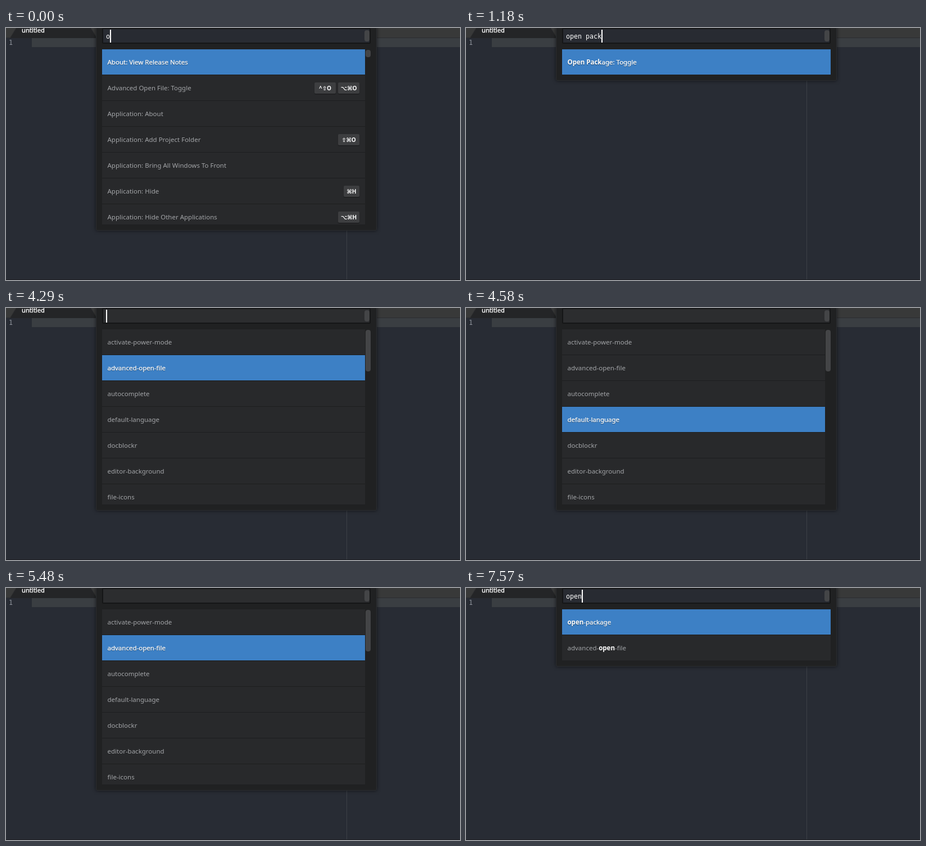
An HTML page that plays this animation: 808 px wide and 449 px high, repeating every 8000 ms.

```html
<!DOCTYPE html>
<html lang="en">
<head>
<meta charset="utf-8">
<title>Open package</title>
<style>
  html, body { margin: 0; width: 100%; height: 100%; overflow: hidden; background: #282c34; }
  #stage { position: relative; width: 808px; height: 449px; overflow: hidden; background: #282c34;
    font: 11.5px "Noto Sans", "Open Sans", sans-serif; }
  #stage div, #stage svg { position: absolute; box-sizing: border-box; }
  #line { left: 46px; top: 18px; width: 762px; height: 16px; background: #3a3e42; }
  #guide { left: 606px; top: 18px; width: 1px; height: 431px; background: #3c4047; }
  #foot { left: 0; top: 448px; width: 808px; height: 1px; background: #1c1e22; }
  #name { left: 28px; top: -4px; line-height: 16px; font-size: 11.2px; color: #fff; -webkit-text-stroke: .35px #fff; }
  #num { left: 5px; top: 18px; line-height: 16px; color: #8f949c; font: 11.65px/16px "DejaVu Sans Mono", monospace; }
  #panel { left: 160px; top: -10px; width: 500px; background: #202122; border: 1px solid #2b2d30;
    border-radius: 3px; box-shadow: 0 0 6px rgba(0, 0, 0, .6); }
  #field { left: 171px; top: 0; width: 478px; height: 28px; border: 2px solid #151617; border-radius: 2px; }
  #typed { left: 178px; top: 3px; white-space: pre; color: #fff; font: 11.65px/24px "DejaVu Sans Mono", monospace; }
  #caret { top: 3px; width: 2px; height: 23px; background: #fff; }
  .bar { width: 9px; border-radius: 4px; background: #444547; }
  #list { left: 171px; top: 38px; overflow: hidden; background: #1d1e1f; }
  #list .row { left: 0; width: 100%; height: 45px; padding-left: 9.5px; line-height: 45px;
    white-space: pre; color: #a3a5a8; background: #28292b; }
  #list .row.on { color: #fff; background: #3d80c5; text-shadow: 0 1px 1px rgba(0, 0, 0, .5); -webkit-text-stroke: .25px #fff; }
  #list b { color: #fff; -webkit-text-stroke: 0; }
  #list .key { top: 13px; height: 20px; border-radius: 2px; background: #3d3e40; color: #fff;
    font: bold 10px/20px "Noto Sans", "DejaVu Sans", sans-serif; text-align: center; box-shadow: 0 1px 1px #18191a; }
</style>
</head>
<body>
<div id="stage">
  <svg width="808" height="18" style="left:0;top:0">
    <rect width="808" height="18" fill="#383939"/>
    <path d="M0 17.5H808" stroke="#2b2d30"/>
    <path d="M7 18L18 0H151L162 18Z" fill="#242527"/>
    <path d="M7 18L18 0M151 0L162 18" stroke="#2f3032" fill="none"/>
  </svg>
  <div id="name">untitled</div>
  <div id="line"></div>
  <div id="num">1</div>
  <div id="guide"></div>
  <div id="foot"></div>
  <div id="panel"></div>
  <div id="field"></div>
  <div class="bar" style="left:638px;top:4px;height:20px"></div>
  <div id="typed"></div>
  <div id="caret"></div>
  <div id="list"></div>
  <div class="bar" id="thumb" style="left:640px;top:39px"></div>
</div>
<script>
const LOOP = 8000, CHAR = 7.0, LIST_MAX = 312;
const $ = id => document.getElementById(id);

// Each entry is a label, with its shortcuts after "|".
const list = (thumb, ...items) => ({ thumb, items });
const toggle = "Open Package: Toggle";
const openFile = "Advanced Open File: Toggle|^⇧O|⌥⌘O";
const all = list(13, "About: View Release Notes", openFile, "Application: About",
  "Application: Add Project Folder|⇧⌘O", "Application: Bring All Windows To Front",
  "Application: Hide|⌘H", "Application: Hide Other Applications|⌥⌘H");
const opens = list(90, toggle, openFile, "Application: Open|⌘O", "Application: Open Folder",
  "Application: Open License", "Application: Open Your Config", "Application: Open Your Keymap");
const openP = list(0, toggle, "Application: Open Your Snippets");
const one = list(0, toggle);

const packages = list(74, "activate-power-mode", "advanced-open-file", "autocomplete",
  "default-language", "docblockr", "editor-background", "file-icons");
const withO = list(150, "open-package", "advanced-open-file", "docblockr", "autocomplete",
  "editor-background", "activate-power-mode", "file-icons");
const withOp = list(0, "open-package", "advanced-open-file", "autocomplete");
const withOpen = list(0, "open-package", "advanced-open-file");

// Time, then what changes from then on.
const steps = [
  [0, { text: "o", query: "", list: all, sel: 0, caret: 1 }],
  [150, { text: "op", list: opens }],
  [300, { text: "ope" }],
  [450, { text: "open" }],
  [590, { text: "open " }],
  [740, { text: "open p", list: openP }],
  [890, { text: "open pa", list: one }],
  [1030, { text: "open pac" }],
  [1180, { text: "open pack" }],
  [1330, { text: "open packa" }],
  [1480, { text: "open packag" }],
  [1620, { text: "open package" }],
  [2070, { caret: 0 }],
  [2360, { caret: 1 }],
  [2810, { caret: 0 }],
  [3250, { text: "", list: packages, caret: 1 }],
  [3550, { caret: 0 }],
  [3990, { caret: 1 }],
  [4290, { sel: 1 }],
  [4430, { sel: 2, caret: 0 }],
  [4580, { sel: 3 }],
  [4730, { sel: 4, caret: 1 }],
  [5180, { sel: 3, caret: 0 }],
  [5330, { sel: 2 }],
  [5480, { sel: 1 }],
  [5620, { caret: 1 }],
  [5770, { sel: 0 }],
  [5920, { caret: 0 }],
  [6370, { caret: 1 }],
  [6820, { caret: 0 }],
  [6970, { text: "o", list: withO, caret: 1 }],
  [7270, { text: "op", list: withOp }],
  [7420, { text: "ope" }],
  [7570, { text: "open", list: withOpen }]
];

let last = {};
const states = steps.map(([at, change]) => {
  last = { ...last, query: change.text ?? last.query, ...change, at };
  return last;
});

// Bold the whole match if there is one, otherwise its letters in order.
function mark(label, query) {
  if (!query) return label;
  const low = label.toLowerCase(), i = low.indexOf(query);
  if (i >= 0) {
    const end = i + query.length;
    return label.slice(0, i) + "<b>" + label.slice(i, end) + "</b>" + label.slice(end);
  }
  const letters = query.replace(/ /g, "");
  let n = 0;
  return [...label].map(c => c.toLowerCase() === letters[n] ? (n++, `<b>${c}</b>`) : c).join("");
}

function row(item, i, s) {
  const [label, ...keys] = item.split("|");
  let right = 10;
  const badges = keys.reverse().map(k => {
    const w = 8 + 10 * k.length;
    const html = `<div class="key" style="right:${right}px;width:${w}px">${k}</div>`;
    right += w + 4;
    return html;
  }).join("");
  return `<div class="row${i === s.sel ? " on" : ""}" style="top:${46 * i}px">${mark(label, s.query)}${badges}</div>`;
}

function draw(s) {
  const { items, thumb } = s.list;
  const height = Math.min(LIST_MAX, 46 * items.length - 1);
  $("list").style.width = (thumb ? 468 : 478) + "px";
  $("list").style.height = height + "px";
  $("list").innerHTML = items.map((item, i) => row(item, i, s)).join("");
  $("panel").style.height = height + 59 + "px";
  $("thumb").style.height = thumb + "px";
  $("field").style.background = s.text ? "#282b32" : "#2c2d2f";
  $("typed").textContent = s.text;
  $("caret").style.left = 178 + Math.round(CHAR * s.text.length) + "px";
  $("caret").style.opacity = s.caret;
}

let shown;
function tick() {
  const t = performance.now() % LOOP;
  const s = states.findLast(st => st.at <= t);
  if (s !== shown) draw(shown = s);
  requestAnimationFrame(tick);
}
tick();
</script>
</body>
</html>
```
